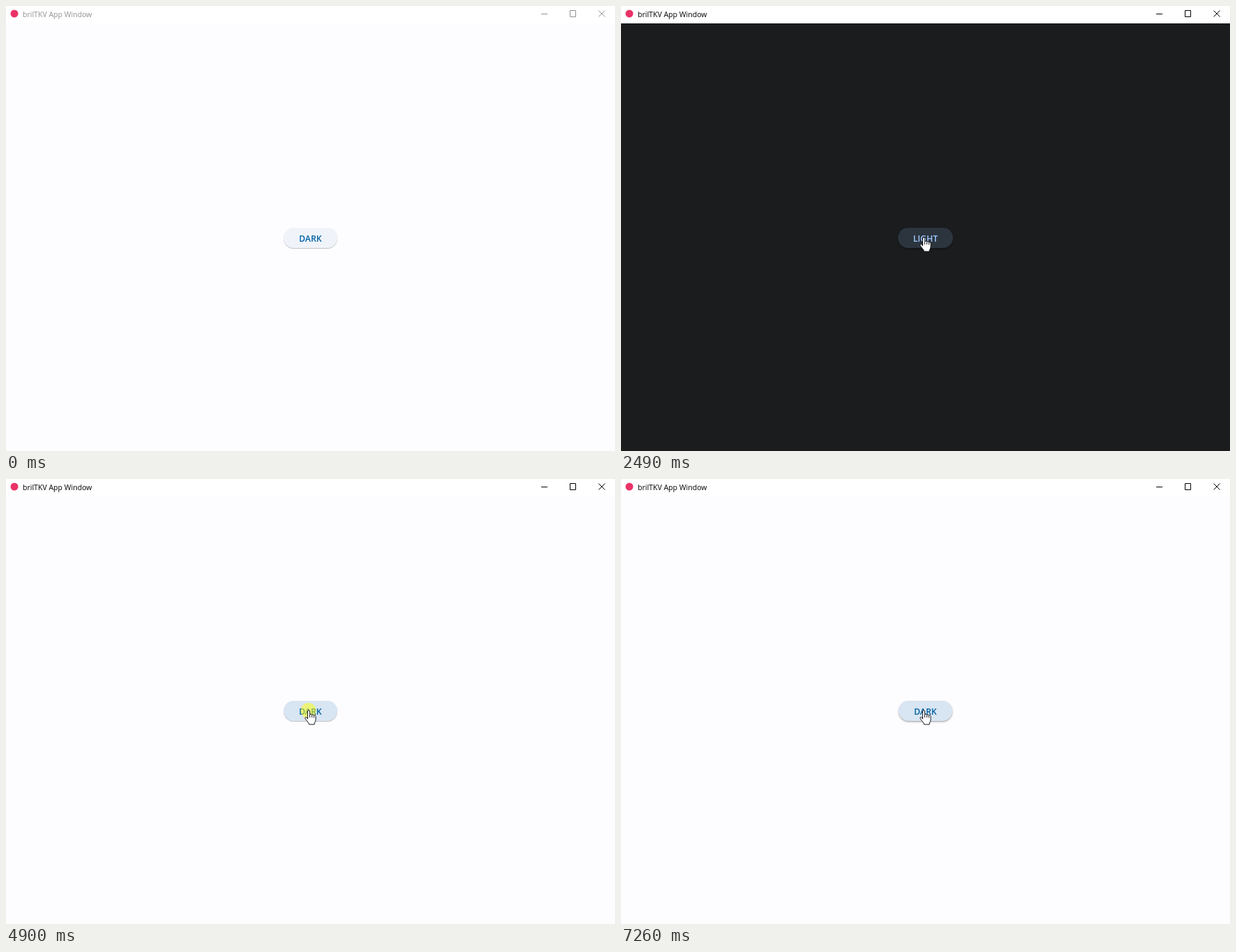
Animation, 875 px wide and 640 px high, one loop 7.87 s. Source, as an HTML page:

```html
<!DOCTYPE html>
<html lang="en">
<head>
<meta charset="utf-8">
<title>Theme toggle</title>
<style>
  html, body { margin: 0; width: 100%; height: 100%; overflow: hidden; background: #fff; }
  #stage { position: relative; width: 875px; height: 640px; overflow: hidden; background: #fff; }
  #page { position: absolute; left: 0; top: 25px; width: 875px; height: 615px; }
  #button { position: absolute; top: 319px; height: 28.5px; border-radius: 14.25px; }
  svg { position: absolute; left: 0; top: 0; }
  text { font-family: "Open Sans", "Noto Sans", sans-serif; }
</style>
</head>
<body>
<div id="stage">
  <div id="page"></div>
  <div id="button"></div>
  <svg width="875" height="640" viewBox="0 0 875 640">
    <circle cx="12" cy="11" r="5.5" fill="#ea3266"/>
    <g id="bar">
      <text x="24" y="15.5" font-size="10.55" fill="currentColor">brilTKV App Window</text>
      <g fill="none" stroke="currentColor">
        <path d="M769 11.5H778M810.5 6.5H818.5V15.5H810.5Z"/>
        <path d="M851.5 6.5L860.5 15.5M860.5 6.5L851.5 15.5"/>
      </g>
    </g>
    <text id="label" x="437.4" y="339" font-size="12.3" font-weight="600" text-anchor="middle"></text>
    <circle id="press" cx="434.5" cy="333" r="11" fill="rgba(255,255,0,.5)"/>
    <g id="arrow" fill="#fff" stroke="#000" stroke-linejoin="round">
      <path d="M.5 .5V16.5L4.2 13L6.7 18.5L9 17.5L6.6 12H11.7Z"/>
    </g>
    <g id="hand" fill="#fff" stroke="#15181c" stroke-linejoin="round">
      <path d="M-.5 13V2C-.5 .2 2.5 .2 2.5 2V7C3 5.8 5.5 5.9 5.5 7.4C6 6.3 8.3 6.5 8.3 8.2C9 7.2 11 7.6 11 9.3V14C11 17 9 18 9 21H1.5C1.3 18.5 -2.5 15.5 -4 12.5C-4.7 11 -3.2 9.8 -2 11Z"/>
      <path d="M2.5 7V11M5.5 7.4V11M8.3 8.2V11.5" fill="none"/>
    </g>
  </svg>
</div>
<script>
const LOOP = 7870, STEP = 67, ENTER = 930, ENTER_STEP = 71;
const FADE = 200;

// wait: time from the press to the theme switch
const clicks = [
  { at: 2020, wait: 67, dark: true },
  { at: 3360, wait: 163, dark: false },
  { at: 4900, wait: 133, dark: true },
  { at: 6720, wait: 134, dark: false }
];

const light = { page: [253, 252, 255], button: [216, 229, 242], text: [0, 97, 164] };
const dark = { page: [26, 28, 30], button: [44, 53, 62], text: [158, 202, 255] };
const idleButton = "#f0f4fa";

const $ = id => document.getElementById(id);
const [page, button, bar, label, press, arrow, hand] =
  ["page", "button", "bar", "label", "press", "arrow", "hand"].map($);

const clamp = v => Math.max(0, Math.min(1, v));
const mix = (a, b, p) => `rgb(${a.map((v, i) => Math.round(v + (b[i] - v) * p))})`;
const show = (el, on) => { el.style.display = on ? "" : "none"; };

// The label colour chases the theme and settles one fade later.
function textProgress(ms) {
  const u = ms / FADE;
  return u <= 0 ? 0 : u < 1 ? u * u / 2 : clamp(u / 2);
}

function cursorAt(t) {
  const k = Math.floor((t - ENTER) / ENTER_STEP);
  const rest = (1 - clamp(k / 6)) ** 2;
  return { x: 434 + 402 * rest, y: 332 + 135 * rest };
}

function draw(t) {
  const click = clicks.filter(c => c.at <= t).pop();
  const present = t >= ENTER;
  const pos = cursorAt(t);
  const over = present && pos.x < 476 && pos.y < 348;

  let from = light, to = light, theme = 1, text = 1, since = Infinity, isDark = false;
  if (click) {
    since = Math.floor((t - click.at) / STEP) * STEP;
    const run = since - click.wait;
    [from, to] = click.dark ? [light, dark] : [dark, light];
    theme = clamp(run / FADE);
    text = textProgress(run);
    isDark = (run >= 0) === click.dark;
  }

  bar.style.color = click ? "#000" : "#929292";
  page.style.background = mix(from.page, to.page, theme);
  button.style.background = over ? mix(from.button, to.button, theme) : idleButton;
  button.style.left = (isDark ? 398 : 399) + "px";
  button.style.width = (isDark ? 79 : 77) + "px";
  button.style.boxShadow = over && since > 420
    ? "0 1px 2px rgba(0,0,0,.26), 0 2px 3px rgba(0,0,0,.12)"
    : "0 1px 1px rgba(0,0,0,.24)";
  label.textContent = isDark ? "LIGHT" : "DARK";
  label.style.fill = mix(from.text, to.text, text);

  show(press, since < 2 * STEP);
  show(arrow, present && !over);
  show(hand, over);
  for (const el of [arrow, hand]) el.setAttribute("transform", `translate(${pos.x} ${pos.y})`);
}

function tick() {
  draw(performance.now() % LOOP);
  requestAnimationFrame(tick);
}
tick();
</script>
</body>
</html>
```
